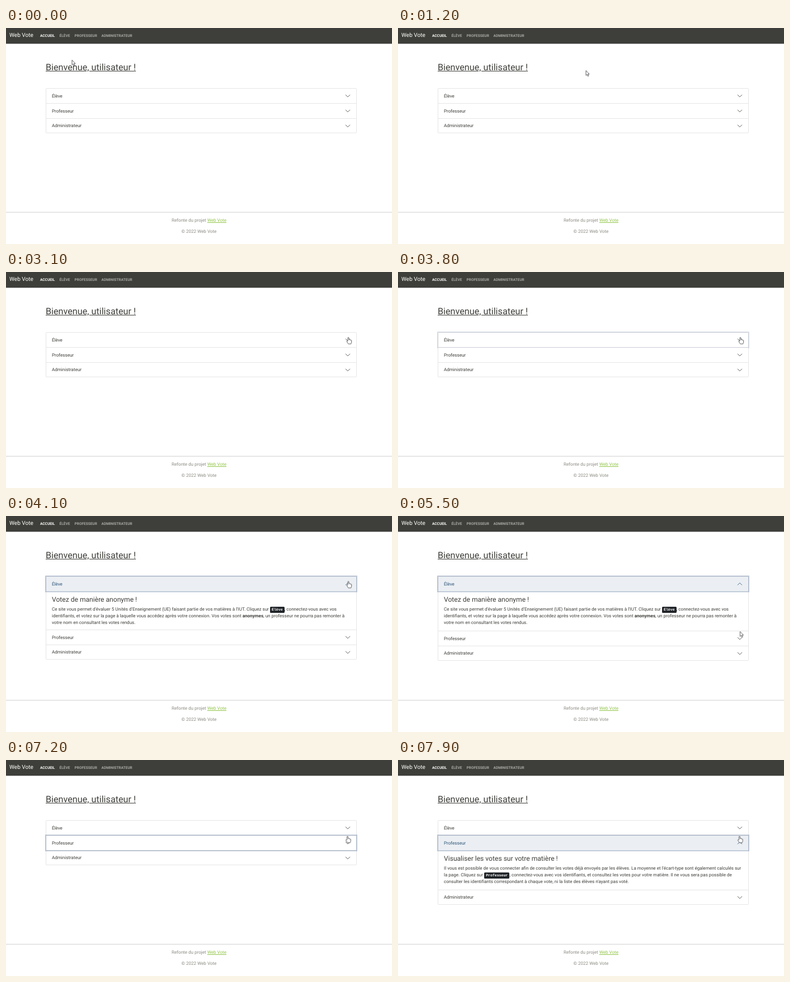
Recreate the animation shown at these times as an HTML page. Size 690 px wide and 388 px high, loop 8000 ms.

```html
<!DOCTYPE html>
<html lang="fr">
<head>
<meta charset="utf-8">
<title>Web Vote</title>
<style>
  @property --turn { syntax: "<angle>"; inherits: false; initial-value: 0deg; }
  :root { --t: 0; --ink: #3e3f3a; --blue: #2d547a; --line: #e6e6e6; }
  html, body { margin: 0; width: 100%; height: 100%; }
  html { overflow: hidden; background: #fff; }
  body {
    position: relative; color: var(--ink); font: 8.075px/12.07px Roboto, sans-serif; white-space: nowrap;
    /* An invisible tilt turns glyph hinting off, as on a scaled-down page */
    text-rendering: geometricPrecision; transform: rotate(.002deg); transform-origin: 0 0;
  }

  nav { position: absolute; inset: 0 0 auto; height: 28px; background: var(--ink); box-shadow: 0 1px #3e3f3a4d; line-height: 28px; }
  nav * { position: absolute; top: 0; color: #a9aaa7; font-size: 6.54px; font-weight: 600; }
  nav .brand { left: 6px; color: #fff; font-size: 10.1px; font-weight: 400; }
  nav .here { color: #fff; }

  h1 { position: absolute; left: 71px; top: 61px; margin: 0; font-size: 16.2px; font-weight: 400; line-height: 19px; text-decoration: underline; }

  .list { position: absolute; left: 71px; top: 108px; width: 556px; }
  .item { border: 1px solid var(--line); border-top-width: 0; background: #fff; }
  .item:first-child { border-top-width: 1px; border-radius: 2px 2px 0 0; }
  .item:last-child { border-radius: 0 0 2px 2px; }
  .head { position: relative; z-index: 3; height: 26px; padding-left: 10px; line-height: 27px; }
  .item:last-child .head { height: 25px; line-height: 25px; }
  .head svg { position: absolute; left: 534px; top: 8px; width: 10px; height: 10px; fill: none; stroke: currentColor; stroke-width: 1.3; stroke-linecap: round; stroke-linejoin: round; transform: rotate(var(--turn)); }
  .panel { height: 0; overflow: hidden; }
  h2 { margin: 7.75px 0 4.9px 10px; font-size: 12.1px; font-weight: 400; line-height: 14.5px; }
  p { margin: 0 0 0 10px; }
  kbd { padding: 2.2px 3.2px; border-radius: 1.6px; background: #212529; color: #fff; font: bold 6.5px/0 "Liberation Mono", monospace; }

  footer { position: absolute; inset: 330px 0 0; border-top: 2px solid var(--line); color: #8e8c84; text-align: center; }
  footer div { position: absolute; left: 0; width: 100%; }
  footer u { color: #93c54b; }

  #cursor { position: absolute; left: 0; top: 0; z-index: 9; width: 1px; height: 1px; overflow: visible; fill: #fff; stroke: #33343a; stroke-width: .8; stroke-linejoin: round; }

  /* Paused animations, scrubbed through --t */
  .head, .head svg, .panel, #cursor, #cursor path {
    animation: none 8s ease calc(var(--t) * -1ms) infinite paused;
  }
  .one .head { animation-name: ring1, tint1; }
  .one svg { animation-name: turn1; }
  .one .panel { animation-name: open1; }
  .two .head { animation-name: ring2, tint2; }
  .two svg { animation-name: turn2; }
  .two .panel { animation-name: open2; }
  #cursor { animation-name: move; animation-timing-function: linear; }
  #cursor path { animation-timing-function: step-end; }
  #cursor .arrow { animation-name: arrow; }
  #cursor .hand { animation-name: hand; }

  @keyframes ring1 {
    0%, 46.875%, 90.125%, 100% { box-shadow: 0 0 0 2px #3f5a8500; }
    48.75%, 88.25% { box-shadow: 0 0 0 2px #3f5a8550; }
  }
  @keyframes tint1 {
    0%, 47.875%, 82.1875%, 100% { background: #fff; color: var(--ink); }
    49.75%, 80.3125% { background: #ebeff3; color: var(--blue); }
  }
  @keyframes turn1 {
    0%, 47.875%, 82.8125%, 100% { --turn: 0deg; }
    50.375%, 80.3125% { --turn: -180deg; }
  }
  @keyframes open1 {
    0%, 47.875%, 84.6875%, 100% { height: 0; }
    52.25%, 80.3125% { height: 71px; }
  }
  @keyframes ring2 {
    0%, 88.25% { box-shadow: 0 0 0 2px #3f5a8500; }
    90.125%, 100% { box-shadow: 0 0 0 2px #3f5a8550; }
  }
  @keyframes tint2 {
    0%, 90.25% { background: #fff; color: var(--ink); }
    92.125%, 100% { background: #ebeff3; color: var(--blue); }
  }
  @keyframes turn2 {
    0%, 90.25% { --turn: 0deg; }
    92.75%, 100% { --turn: -180deg; }
  }
  @keyframes open2 {
    0%, 90.25% { height: 0; }
    94.625%, 100% { height: 71px; }
  }
  @keyframes move {
    0%, 5% { transform: translate(118px, 57.5px); }
    10%, 11.25% { transform: translate(255px, 92px); }
    17.5% { transform: translate(390px, 66px); }
    22.5% { transform: translate(489px, 51px); }
    25.6% { transform: translate(422px, 35px); }
    28.75% { transform: translate(403px, 56.5px); }
    33.75% { transform: translate(587px, 103px); }
    37.5%, 57.5% { transform: translate(612px, 117.5px); }
    62.5% { transform: translate(612px, 140px); }
    67.5% { transform: translate(612px, 193px); }
    68.75% { transform: translate(611.5px, 207.5px); }
    71.25%, 73.75% { transform: translate(613px, 217px); }
    78.75%, 85% { transform: translate(620px, 119.5px); }
    88.125%, 100% { transform: translate(610.5px, 137px); }
  }
  @keyframes arrow {
    0%, 62.5%, 75% { opacity: 1; }
    36.25%, 70%, 78.75%, 100% { opacity: 0; }
  }
  @keyframes hand {
    0%, 62.5%, 75% { opacity: 0; }
    36.25%, 70%, 78.75%, 100% { opacity: 1; }
  }
</style>
</head>
<body>
<nav>
  <span class="brand">Web Vote</span>
  <span class="here" style="left:61px">ACCUEIL</span>
  <span style="left:95.5px">ÉLÈVE</span>
  <span style="left:122.5px">PROFESSEUR</span>
  <span style="left:170.5px">ADMINISTRATEUR</span>
</nav>

<h1>Bienvenue, utilisateur !</h1>

<div class="list">
  <div class="item one">
    <div class="head">Élève<svg viewBox="0 0 16 16"><path d="M2 5l6 6 6-6"/></svg></div>
    <div class="panel">
      <h2>Votez de manière anonyme !</h2>
      <p>Ce site vous permet d'évaluer 5 Unités d'Enseignement (UE) faisant partie de vos matières à l'IUT. Cliquez sur <kbd>Élève</kbd>, connectez-vous avec vos<br>
      identifiants, et votez sur la page à laquelle vous accédez après votre connexion. Vos votes sont <b>anonymes</b>, un professeur ne pourra pas remonter à<br>
      votre nom en consultant les votes rendus.</p>
    </div>
  </div>
  <div class="item two">
    <div class="head">Professeur<svg viewBox="0 0 16 16"><path d="M2 5l6 6 6-6"/></svg></div>
    <div class="panel">
      <h2>Visualiser les votes sur votre matière !</h2>
      <p>Il vous est possible de vous connecter afin de consulter les votes déjà envoyés par les élèves. La moyenne et l'écart-type sont également calculés sur<br>
      la page. Cliquez sur <kbd>Professeur</kbd>, connectez-vous avec vos identifiants, et consultez les votes pour votre matière. Il ne vous sera pas possible de<br>
      consulter les identifiants correspondant à chaque vote, ni la liste des élèves n'ayant pas voté.</p>
    </div>
  </div>
  <div class="item">
    <div class="head">Administrateur<svg viewBox="0 0 16 16"><path d="M2 5l6 6 6-6"/></svg></div>
  </div>
</div>

<footer>
  <div style="top:7.5px">Refonte du projet <u>Web Vote</u></div>
  <div style="top:27.5px">© 2022 Web Vote</div>
</footer>

<svg id="cursor">
  <path class="arrow" d="M0 0V8.8L2 7 3.4 10.2 4.8 9.6 3.5 6.4H6Z"/>
  <path class="hand" d="M-1 6.5V1a1 1 0 0 1 2 0V4.2a.9.9 0 0 1 1.7.1V4.6a.9.9 0 0 1 1.6.2V5.3a.8.8 0 0 1 1.4.3V8.5L4.6 11.7H0L-2.8 7.4a.9.9 0 0 1 1.4-1.1Z"/>
</svg>

<script>
  const LOOP = 8000, STEP = 100;
  const start = performance.now();
  let last = -1;

  function tick() {
    const time = Math.max(0, performance.now() - start) % LOOP;
    const t = Math.floor(time / STEP) * STEP;
    if (t !== last) document.documentElement.style.setProperty('--t', last = t);
    requestAnimationFrame(tick);
  }
  tick();
</script>
</body>
</html>
```
